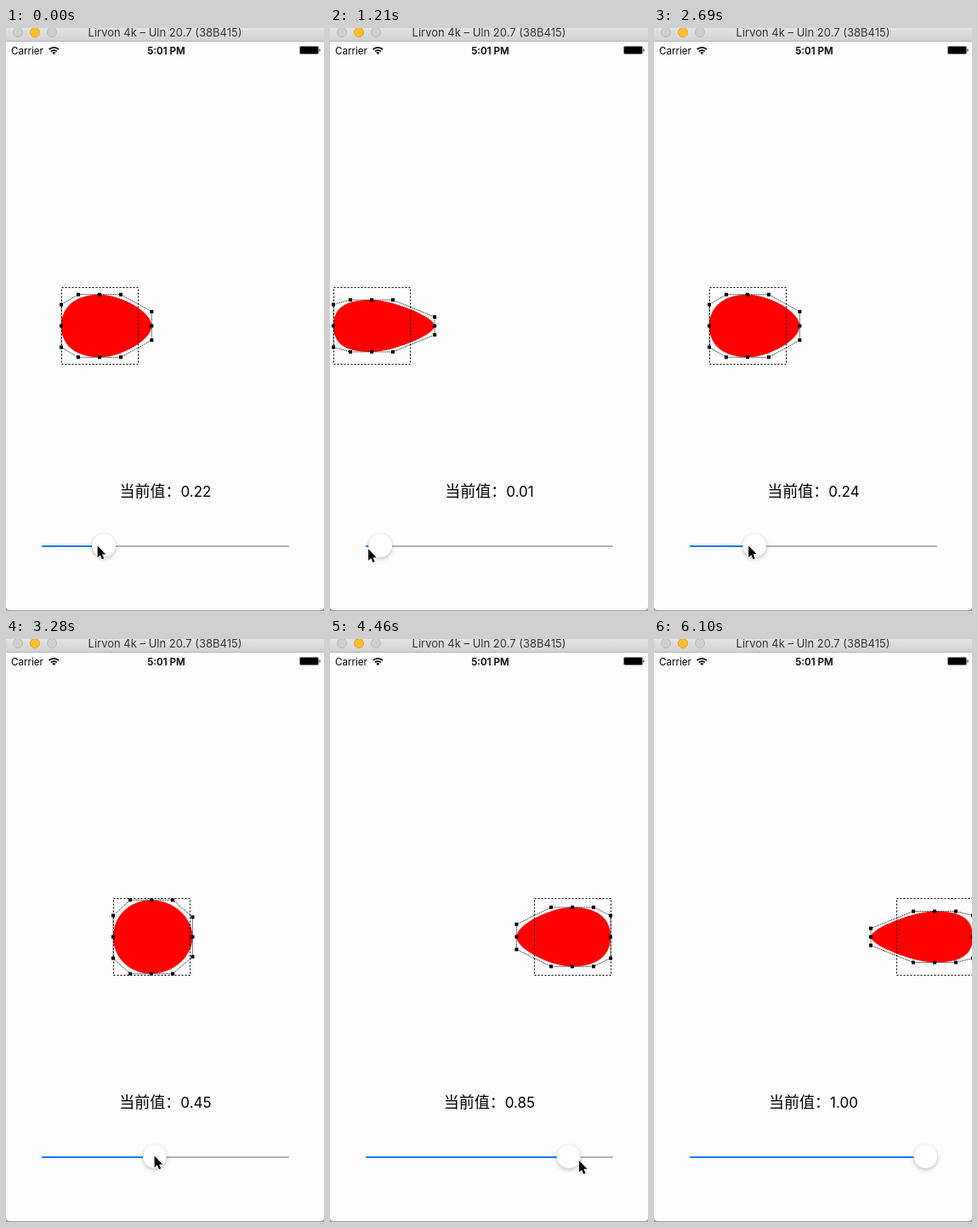
An HTML page for the animation above (6.35 s loop, 374 px wide and 684 px high).

```html
<!DOCTYPE html>
<html lang="zh-CN">
<head>
<meta charset="utf-8">
<title>Stretchy circle slider</title>
<style>
html, body { margin: 0; width: 100%; height: 100%; overflow: hidden; background: #fdfdfd; }
svg { display: block; width: 374px; height: 684px; }
text { font-family: Inter, Roboto, sans-serif; fill: #000; }
.label { font-family: "Noto Sans CJK SC", "Noto Sans CJK", sans-serif; font-size: 18px; }
.num { font-family: Inter, Roboto, sans-serif; font-size: 17px; }
.thumb { filter: drop-shadow(0 2.5px 2px rgba(0,0,0,.22)); }
.line { fill: none; stroke: #000; stroke-width: 1; }
</style>
</head>
<body>
<svg viewBox="0 0 374 684">
  <defs>
    <linearGradient id="bar" x2="0" y2="1">
      <stop offset="0" stop-color="#e3e3e3"/>
      <stop offset="1" stop-color="#d2d2d2"/>
    </linearGradient>
  </defs>
  <rect width="374" height="684" fill="#fdfdfd"/>
  <rect width="374" height="15" fill="url(#bar)"/>
  <rect y="15" width="374" height="1" fill="#b4b4b4"/>
  <g stroke-width="1">
    <circle cx="14" cy="5" r="5.5" fill="#d0d0d0" stroke="#bababa"/>
    <circle cx="34" cy="5" r="5.5" fill="#ffbd2e" stroke="#e2a32a"/>
    <circle cx="54" cy="5" r="5.5" fill="#d0d0d0" stroke="#bababa"/>
  </g>
  <text x="187" y="10" font-size="13" text-anchor="middle" style="fill:#333">Lirvon 4k – Uln 20.7 (38B415)</text>

  <text x="6" y="31" font-size="11.6">Carrier</text>
  <text x="188.5" y="31" font-size="11.6" font-weight="600" text-anchor="middle">5:01 PM</text>
  <g fill="none" stroke="#000" stroke-width="1.7">
    <path d="M50.6 25.2a8 8 0 0 1 11.4 0M52.8 27.5a4.9 4.9 0 0 1 7 0"/>
    <path d="M56.3 31l-2-2.1a2.8 2.8 0 0 1 4 0z" fill="#000" stroke="none"/>
  </g>
  <rect x="345.5" y="21.5" width="22" height="9" rx="1.5" fill="#000" stroke="#888"/>
  <path d="M368.5 24.3a2 2 0 0 1 0 3.6z"/>

  <path id="blob" fill="#f00"/>
  <rect id="frame" class="line" y="304.5" width="90" height="90" stroke-dasharray="2 2"/>
  <path id="guide" class="line" stroke-dasharray="1 1"/>
  <path id="dots"/>

  <text class="label" x="187.5" y="550" text-anchor="middle">当前值：<tspan id="num" class="num"></tspan></text>

  <rect x="42" y="607" width="291" height="2" rx="1" fill="#b2b2b2"/>
  <rect id="fill" x="42" y="607" height="2" rx="1" fill="#0a7cf0"/>
  <circle id="thumb" class="thumb" cy="607" r="14" fill="#fff" stroke="#000" stroke-opacity=".1" stroke-width=".5"/>

  <path d="M0 684V679Q0 683 5 683H369Q374 683 374 679V684Z" fill="#9b9b9b"/>
  <path id="cursor" d="M0 0V13.6L3.2 10.8L5.3 15.7L7.6 14.7L5.5 9.9H9.7Z" fill="#000" stroke="#fff" stroke-width="2" stroke-linejoin="round" paint-order="stroke"/>
</svg>
<script>
const LOOP = 6350, SIZE = 90, TOP = 304.5, TRAVEL = 285;
// Step numbers where the drag reaches the left end, the right end, and the last step.
const LEFT = 12, RIGHT = 36, LAST = 40;
const $ = id => document.getElementById(id);

const easeIn = n => f => f ** n;
const easeOut = n => f => 1 - (1 - f) ** n;
const legs = [
  { from: 0, to: LEFT, a: .2249, b: 0, ease: easeOut(2.61) },
  { from: LEFT, to: 21, a: 0, b: .452, ease: easeIn(1.1) },
  { from: 21, to: 28, a: .452, b: .853, ease: easeIn(1.52) },
  { from: 28, to: RIGHT, a: .853, b: 1, ease: easeOut(3) }
];

// The picture refreshes in even steps, with one pause at the left end.
function stepAt(t) {
  const early = Math.min(LEFT, t / 150);
  return Math.floor(Math.min(LAST, Math.max(early, (t - 150) / 148.75)));
}

function valueAt(step) {
  const leg = legs.find(l => step <= l.to);
  if (!leg) return 1;
  return leg.a + (leg.b - leg.a) * leg.ease((step - leg.from) / (leg.to - leg.from));
}

// The shape trails the slider a little while it is dragged.
function progressAt(step, value) {
  if (step < LEFT) return value + .003;
  return step > LEFT && step < RIGHT ? value - .0095 : value;
}

// The pointer overshoots at both ends, then leaves through the bottom.
function cursorAt(step, value) {
  const near = s => Math.max(0, 1 - Math.abs(step - s) / 3);
  const out = Math.max(0, step - RIGHT);
  return [
    41.3 + 295 * value + 8 * (near(RIGHT) - near(LEFT)) + 7 * out,
    606.5 + 29 * (value - .42) ** 2 + 18 * out
  ];
}

function drawShape(p) {
  const x = Math.round(TRAVEL * p);
  const cx = x + SIZE / 2, cy = TOP + SIZE / 2, off = SIZE / 3.6;
  const m = SIZE / 6 * Math.abs(p - .5) * 2;
  const right = p <= .5 ? m : 0, left = m - right;
  const top = TOP + m, bottom = TOP + SIZE - m;
  const bx = x + SIZE + right * 2, dx = x - left * 2;
  const bh = off - right, dh = off - left;
  // Clockwise from the top: anchor, control, control, anchor...
  const pts = [
    [cx, top], [cx + off, top], [bx, cy - bh],
    [bx, cy], [bx, cy + bh], [cx + off, bottom],
    [cx, bottom], [cx - off, bottom], [dx, cy + dh],
    [dx, cy], [dx, cy - dh], [cx - off, top]
  ];
  const [head, ...rest] = pts;
  $("blob").setAttribute("d", `M${head}C${[...rest, head].join(" ")}Z`);
  $("guide").setAttribute("d", `M${pts.join("L")}Z`);
  $("dots").setAttribute("d", pts.map(([u, v]) => `M${u - 2} ${v - 2}h4v4h-4z`).join(""));
  $("frame").setAttribute("x", x + .5);
}

function draw(now) {
  const step = stepAt(now % LOOP);
  const value = valueAt(step);
  const thumb = 55.8 + 263.6 * value;
  drawShape(progressAt(step, value));
  $("num").textContent = value.toFixed(2);
  $("thumb").setAttribute("cx", thumb);
  $("fill").setAttribute("width", thumb - 42);
  $("cursor").setAttribute("transform", `translate(${cursorAt(step, value)})`);
}

let start;
function tick(now) {
  start ??= now;
  draw(Math.max(0, now - start));
  requestAnimationFrame(tick);
}
draw(0);
requestAnimationFrame(tick);
</script>
</body>
</html>
```
